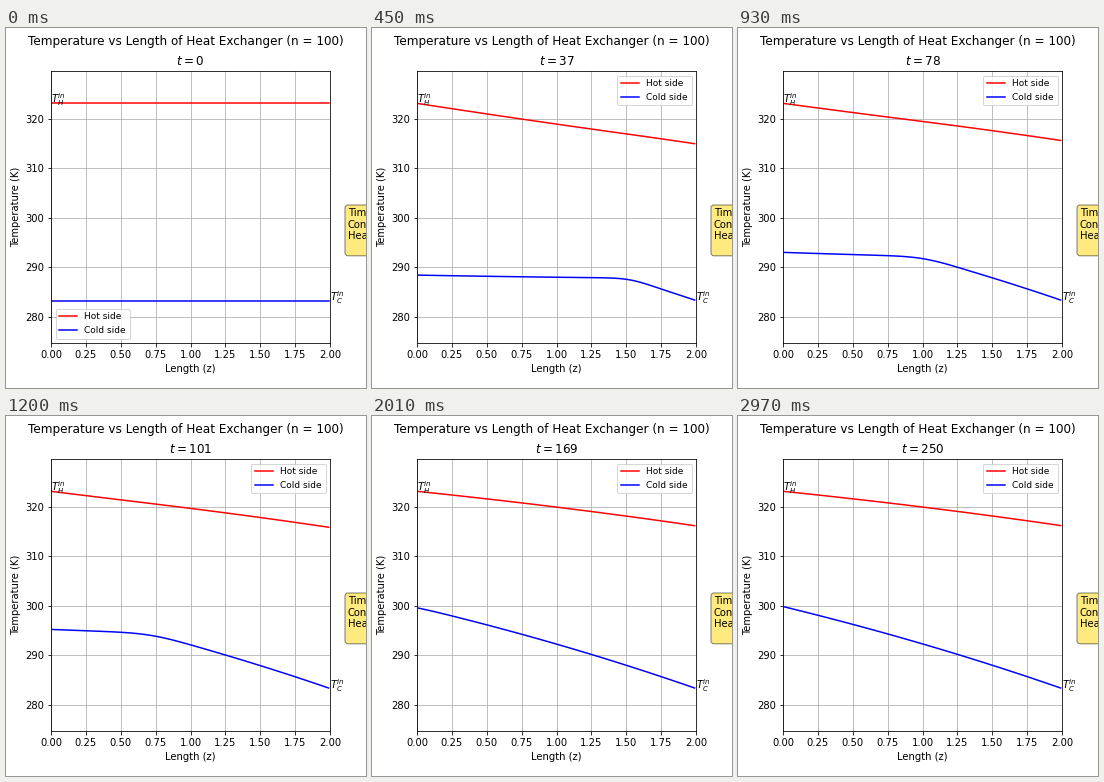
Write a matplotlib script that moves like this. It is 360x360 px and loops after 3 s.

```python
import numpy as np
import matplotlib.pyplot as plt
from matplotlib.animation import FuncAnimation

LENGTH, CELLS = 2.0, 100
T_HOT, T_COLD = 323.15, 283.15
V_HOT, V_COLD = 0.085, 0.01273        # flow speeds
K_HOT = 0.125 * V_HOT                 # heat exchange rates
K_COLD = 0.299 * V_COLD
FRAMES, SUBSTEPS = 100, 25

dz = LENGTH / CELLS
z = np.linspace(dz / 2, LENGTH - dz / 2, CELLS)
times = np.linspace(0, 250, FRAMES)


def rate(state):
    """Counterflow with upwind cells: hot runs right, cold runs left."""
    hot, cold = state
    gap = hot - cold
    hot_in = np.append(T_HOT, hot[:-1])
    cold_in = np.append(cold[1:], T_COLD)
    return np.array([V_HOT * (hot_in - hot) / dz - K_HOT * gap,
                     V_COLD * (cold_in - cold) / dz + K_COLD * gap])


def rk4(state, h):
    k1 = rate(state)
    k2 = rate(state + h / 2 * k1)
    k3 = rate(state + h / 2 * k2)
    k4 = rate(state + h * k3)
    return state + h / 6 * (k1 + 2 * k2 + 2 * k3 + k4)


def solve():
    state = np.array([np.full(CELLS, T_HOT), np.full(CELLS, T_COLD)])
    history = [state]
    h = times[1] / SUBSTEPS
    for _ in range(FRAMES - 1):
        for _ in range(SUBSTEPS):
            state = rk4(state, h)
        history.append(state)
    return history


history = solve()

fig, ax = plt.subplots(figsize=(5, 5), dpi=72)
fig.subplots_adjust(left=0.125, right=0.9, bottom=0.125, top=0.88)
fig.suptitle("Temperature vs Length of Heat Exchanger (n = 100)")

hot_line, = ax.plot(z, history[0][0], color="red", label="Hot side")
cold_line, = ax.plot(z, history[0][1], color="blue", label="Cold side")
ax.set(xlim=(0, LENGTH), ylim=(0.97 * T_COLD, 1.02 * T_HOT),
       xlabel="Length (z)", ylabel="Temperature (K)",
       xticks=np.arange(0, 2.01, 0.25), yticks=range(280, 321, 10))
ax.grid()
ax.legend(loc="best", fontsize=9)
ax.text(0, T_HOT, "$T_H^{in}$")
ax.text(LENGTH, T_COLD, "$T_C^{in}$")
title = ax.set_title("$t = 0$")

# Note box running off the right edge
fig.text(0.95, 0.5, "Time\nConstant\nHeat\n", va="top",
         bbox=dict(boxstyle="round", facecolor="gold", alpha=0.5))


def update(i):
    hot, cold = history[i]
    hot_line.set_ydata(hot)
    cold_line.set_ydata(cold)
    title.set_text(f"$t = {int(times[i])}$")
    return hot_line, cold_line, title


anim = FuncAnimation(fig, update, frames=FRAMES, interval=30, repeat=True)
plt.show()
```
